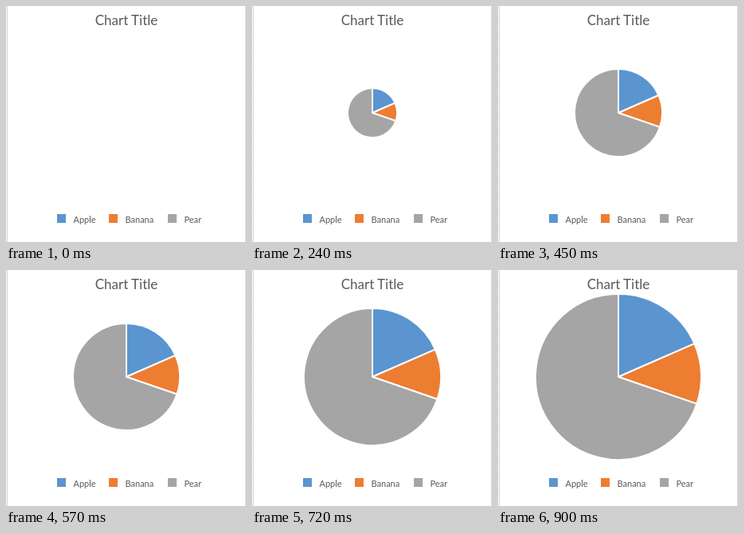
An HTML page for the animation above (1860 ms loop, 301 by 296 pixels).

```html
<!DOCTYPE html>
<html lang="en">
<head>
<meta charset="utf-8">
<title>Growing pie chart</title>
<style>
  html, body { margin: 0; width: 100%; height: 100%; overflow: hidden; background: #fff; }
  svg { display: block; width: 301px; height: 296px; }
  text { font-family: Lato, "Open Sans", sans-serif; fill: #595959; }
  .title { font-size: 17px; text-anchor: middle; }
  .legend { font-size: 11px; }
  #pie path { stroke: #fff; stroke-width: 2; stroke-linejoin: round; }
</style>
</head>
<body>
<svg viewBox="0 0 301 296">
  <g id="grid" fill="#d4d4d4">
    <rect x="1" width="1" height="296"/>
    <rect x="300" width="1" height="296"/>
  </g>
  <text class="title" x="151" y="24">Chart Title</text>
  <g id="pie"></g>
  <g id="legend"></g>
</svg>
<script>
const LOOP = 1860, STEP = 30, START = 60;
const CX = 151, CY = 134;

// start and end angles in degrees, clockwise from the top
const slices = [
  { name: 'Apple',  color: '#5a95d0', from: 0,    to: 66.4, x: 64 },
  { name: 'Banana', color: '#ed7d31', from: 66.4, to: 109,  x: 129 },
  { name: 'Pear',   color: '#a5a5a5', from: 109,  to: 360,  x: 203 }
];

// [time, visible radius]
const growth = [[60, 8], [240, 30], [450, 54], [570, 66], [720, 85], [810, 93], [900, 103]];

function add(parent, tag, attrs, text = '') {
  const el = document.createElementNS('http://www.w3.org/2000/svg', tag);
  for (const key in attrs) el.setAttribute(key, attrs[key]);
  el.textContent = text;
  return document.getElementById(parent).appendChild(el);
}

for (let y = 17; y < 296; y += 20) add('grid', 'rect', { x: 0, y, width: 1, height: 1 });

for (const s of slices) {
  add('legend', 'rect', { x: s.x, y: 261, width: 11, height: 11, fill: s.color });
  add('legend', 'text', { x: s.x + 20.5, y: 272, class: 'legend' }, s.name);
  s.path = add('pie', 'path', { fill: s.color });
}

function radiusAt(t) {
  if (t < START) return 0;
  for (let i = 1; i < growth.length; i++) {
    const [t0, r0] = growth[i - 1], [t1, r1] = growth[i];
    if (t <= t1) return r0 + (r1 - r0) * (t - t0) / (t1 - t0);
  }
  return growth[growth.length - 1][1];
}

function point(deg, r) {
  const a = deg * Math.PI / 180;
  return `${(CX + r * Math.sin(a)).toFixed(2)} ${(CY - r * Math.cos(a)).toFixed(2)}`;
}

function wedge({ from, to }, r) {
  const large = to - from > 180 ? 1 : 0;
  return `M${CX} ${CY}L${point(from, r)}A${r} ${r} 0 ${large} 1 ${point(to, r)}Z`;
}

let shown = -1;
function draw(t) {
  const r = radiusAt(Math.floor(t / STEP) * STEP);
  if (r === shown) return;
  shown = r;
  // half of the white outline covers the rim
  for (const s of slices) s.path.setAttribute('d', r ? wedge(s, r + 1) : '');
}

function tick() {
  draw(performance.now() % LOOP);
  requestAnimationFrame(tick);
}
draw(0);
tick();
</script>
</body>
</html>
```
